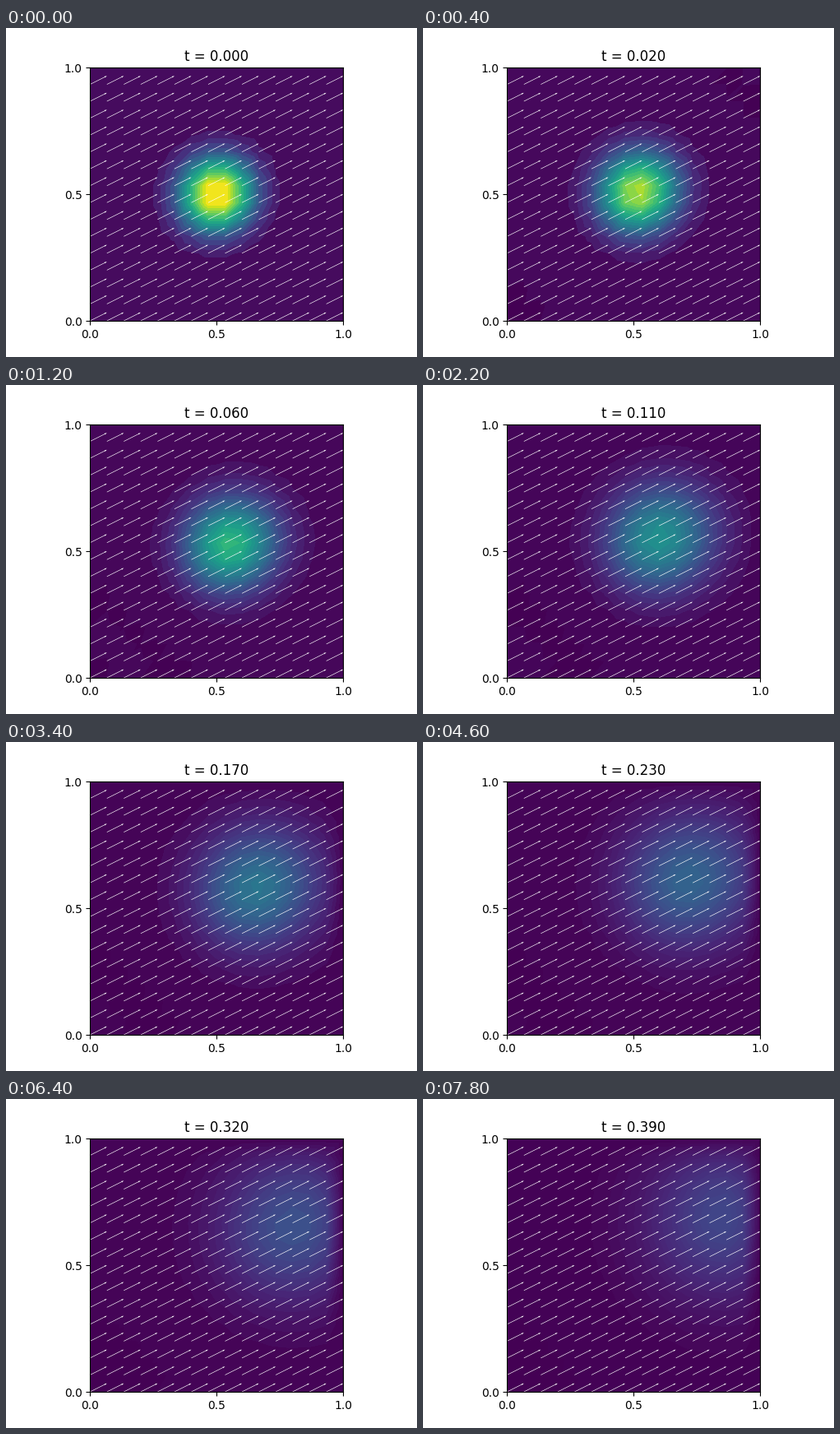
These frames come from a looping animation (500 by 400 pixels, 8000 ms). A matplotlib script:

```python
import numpy as np
import matplotlib.pyplot as plt
from matplotlib.animation import FuncAnimation
from matplotlib.tri import Triangulation

CELLS = 15
DIFFUSION = 0.05
VELOCITY = np.array([1.0, 0.5])
DT = 0.01
FRAMES = 40


def build_mesh(n):
    """Square grid, every cell cut along its rising diagonal."""
    x, y = np.meshgrid(np.linspace(0, 1, n + 1), np.linspace(0, 1, n + 1))
    cells = []
    for j in range(n):
        for i in range(n):
            a = j * (n + 1) + i
            b, c = a + 1, a + n + 1
            cells += [(a, b, c + 1), (a, c + 1, c)]
    return Triangulation(x.ravel(), y.ravel(), cells)


def assemble(mesh):
    """Mass matrix and advection-diffusion matrix for linear elements."""
    size = len(mesh.x)
    mass, flow = np.zeros((size, size)), np.zeros((size, size))
    for tri in mesh.triangles:
        corners = np.column_stack([np.ones(3), mesh.x[tri], mesh.y[tri]])
        area = abs(np.linalg.det(corners)) / 2
        grad = np.linalg.inv(corners)[1:]
        block = np.ix_(tri, tri)
        mass[block] += area / 12 * (np.ones((3, 3)) + np.eye(3))
        flow[block] += DIFFUSION * area * grad.T @ grad
        flow[block] += area / 3 * np.outer(np.ones(3), VELOCITY @ grad)
    return mass, flow


def simulate(mesh):
    """Implicit Euler steps with zero values on the border."""
    mass, flow = assemble(mesh)
    x, y = mesh.x, mesh.y
    inner = np.flatnonzero((x > 1e-9) & (x < 1 - 1e-9) & (y > 1e-9) & (y < 1 - 1e-9))
    block = np.ix_(inner, inner)
    step = np.linalg.solve((mass + DT * flow)[block], mass[block])
    u = np.exp(-50 * ((x - 0.5) ** 2 + (y - 0.5) ** 2))
    states = [u]
    for _ in range(FRAMES - 1):
        new = np.zeros_like(u)
        new[inner] = step @ states[-1][inner]
        states.append(new)
    return states


mesh = build_mesh(CELLS)
states = simulate(mesh)
peak = states[0].max()

fig, ax = plt.subplots(figsize=(5, 4), dpi=100)


def draw(frame):
    ax.clear()
    ax.tricontourf(mesh, states[frame], levels=20, cmap="viridis", vmin=0, vmax=peak)
    ax.quiver(mesh.x, mesh.y, np.full_like(mesh.x, VELOCITY[0]),
              np.full_like(mesh.x, VELOCITY[1]), color="white", scale=15, width=0.002)
    ax.set(xlim=(0, 1), ylim=(0, 1), aspect="equal",
           xticks=[0, 0.5, 1], yticks=[0, 0.5, 1], title=f"t = {frame * DT:.3f}")


anim = FuncAnimation(fig, draw, frames=FRAMES, init_func=lambda: None,
                     interval=200, repeat=True, repeat_delay=0)
plt.show()
```
